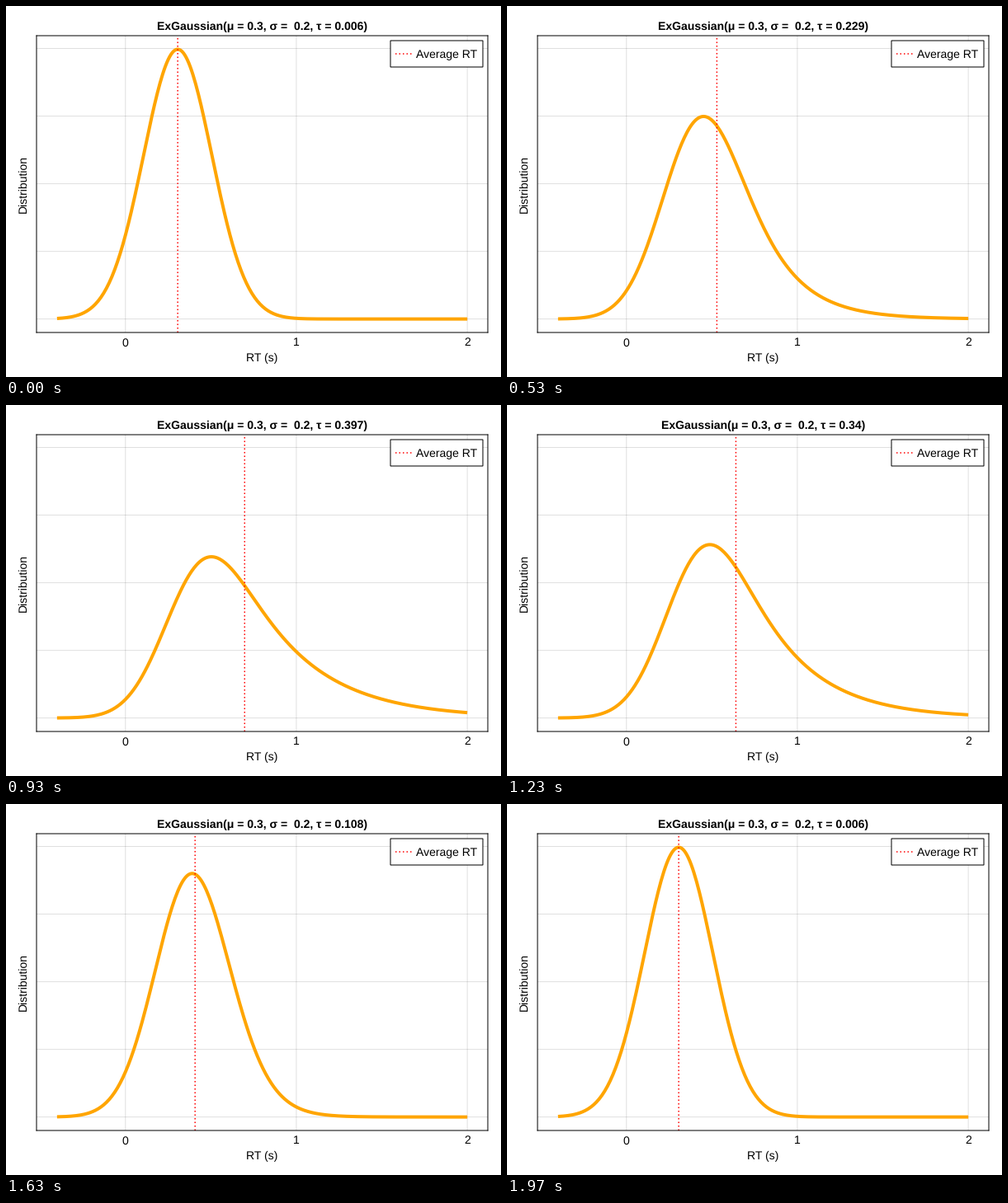
A matplotlib script that plays this animation: 600x450 px, repeating every 2010 ms.

```python
import math

import numpy as np
import matplotlib.pyplot as plt
from matplotlib.animation import FuncAnimation
from matplotlib.patches import Rectangle

W, H, DPI = 600, 450, 100
PX = 72 / DPI  # points per pixel
STEPS = 60
MU, SIGMA = 0.3, 0.2
TAU_MIN, TAU_MAX = 0.006, 0.4

plt.rcParams.update({
    "font.family": "Liberation Sans",
    "font.size": 14 * PX,
    "text.hinting": "none",
    "path.snap": False,
})

erfc = np.vectorize(math.erfc)


def exgaussian(x, tau):
    """Density of a normal variable plus an exponential one."""
    growth = np.exp((MU - x) / tau + SIGMA**2 / (2 * tau**2))
    tail = erfc(((MU - x) / SIGMA + SIGMA / tau) / math.sqrt(2))
    return growth * tail / (2 * tau)


def tau_at(step):
    wave = math.sin(math.pi * step / (STEPS - 1)) ** 2
    return TAU_MIN + (TAU_MAX - TAU_MIN) * wave


fig = plt.figure(figsize=(W / DPI, H / DPI), dpi=DPI, facecolor="white")

# Plot area
left, right, top, bottom = 37, 584, 36, 396
ax = fig.add_axes([left / W, 1 - bottom / H, (right - left) / W, (bottom - top) / H])
ax.set(xlim=(-0.52, 2.12), ylim=(-0.0997, 2.0944),
       xticks=[0, 1, 2], yticks=np.arange(0, 2.1, 0.5))
ax.tick_params(length=0, labelbottom=False, labelleft=False)
ax.grid(color="black", alpha=0.12, linewidth=PX)
ax.set_axisbelow(True)
for spine in ax.spines.values():
    spine.set_linewidth(PX)

x = np.linspace(-0.4, 2, 300)
dots = dict(color="red", lw=1.5 * PX, ls=(0, (1, 2)), dash_capstyle="butt")
curve, = ax.plot([], [], color="orange", lw=4 * PX, solid_capstyle="butt")
mean, = ax.plot([], [], **dots)

# Overlay in pixel coordinates for labels and legend
top_ax = fig.add_axes([0, 0, 1, 1], facecolor="none")
top_ax.set(xlim=(0, W), ylim=(H, 0))
top_ax.axis("off")


def label(px, py, text, **kw):
    kw = {"ha": "center", "va": "baseline", **kw}
    return top_ax.text(px, py, text, **kw)


title = label(310.5, 29, "", weight="bold")
label(310.5, 431.5, "RT (s)")
label(28, 216, "Distribution", rotation=90, ha="right", va="center")
for value in range(3):
    label(left + (value + 0.52) * (right - left) / 2.64, 412.5, str(value))

top_ax.add_patch(Rectangle((466, 42), 112, 32, fc="white", ec="black", lw=PX))
top_ax.plot([472, 492], [58, 58], **dots)
label(497, 63, "Average RT", ha="left")


def update(tick):
    # Steps run at 30 per second, rounded to 10 ms ticks
    step = min(STEPS - 1, 3 * (10 * tick + 4) // 100)
    tau = tau_at(step)
    curve.set_data(x, exgaussian(x, tau))
    mean.set_data([MU + tau] * 2, ax.get_ylim())
    title.set_text(f"ExGaussian(μ = {MU}, σ =  {SIGMA}, τ = {round(tau, 3)})")
    return curve, mean, title


anim = FuncAnimation(fig, update, frames=201, interval=10,
                     repeat=True, repeat_delay=0)
plt.show()
```
